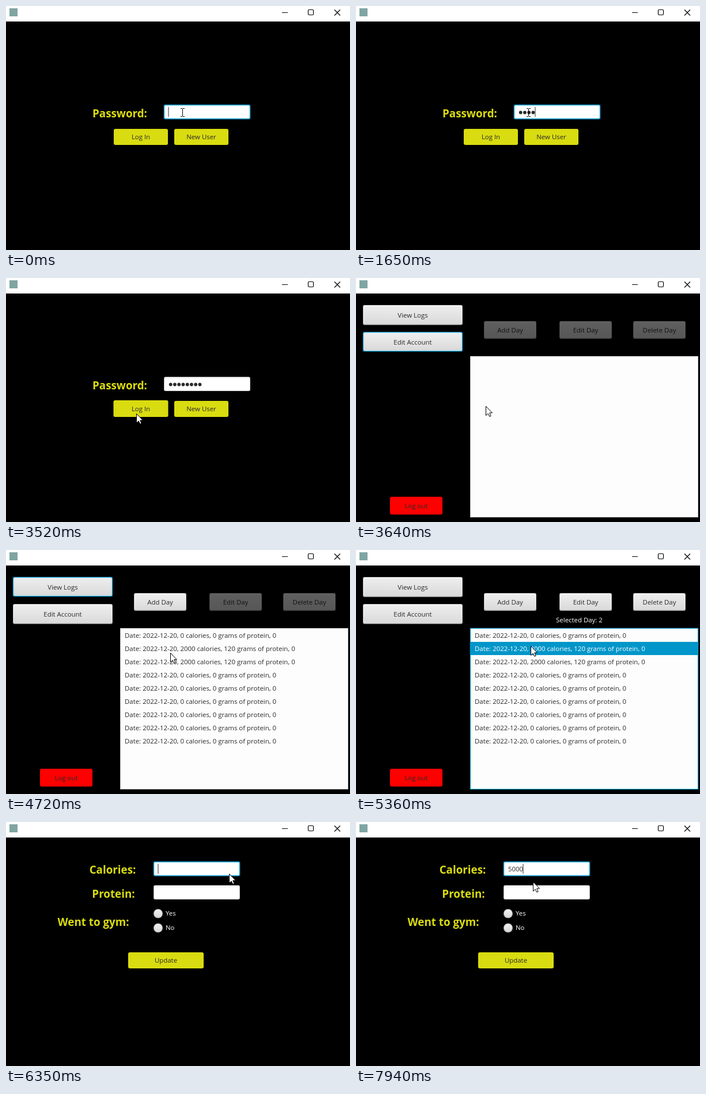
Animation, 597 px wide and 425 px high, one loop 8000 ms. Source, as an HTML page with a canvas:

```html
<!DOCTYPE html>
<html lang="en">
<head>
<meta charset="utf-8">
<title>Calorie log</title>
<style>
  html, body { margin: 0; width: 100%; height: 100%; overflow: hidden; background: #000; }
  canvas { display: block; }
</style>
</head>
<body>
<canvas id="stage" width="597" height="425"></canvas>
<script>
const g = document.getElementById('stage').getContext('2d');
const LOOP = 8000, TICK = 130;
const YELLOW = '#d9dc10', INK = '#2a2a2a', FOCUS = '#039ed3', FAINT = 'rgba(3,158,211,.14)';

// Where the pointer turns or rests: time, x, y.
const path = [
  [0, 306, 185], [480, 306, 185], [610, 299, 185], [2460, 299, 185], [3090, 198, 231],
  [3520, 226, 236], [3640, 225, 223], [4150, 128, 70], [4300, 128, 70], [4720, 285, 179],
  [5120, 285, 179], [6050, 414, 93], [6200, 414, 93], [6740, 303, 82], [7290, 303, 82],
  [7420, 307, 104]
];

const within = (t, from, to) => t >= from && t < to;
const keys = (t, first, count, gap) =>
  Math.max(0, Math.min(count, Math.floor((t - first) / gap) + 1));

function rect(x, y, w, h, inset, radius, fill) {
  g.fillStyle = fill;
  g.beginPath();
  g.roundRect(x + inset, y + inset, w - 2 * inset, h - 2 * inset, radius);
  g.fill();
}

function shade(y, h, top, bottom) {
  const s = g.createLinearGradient(0, y, 0, y + h);
  s.addColorStop(0, top);
  s.addColorStop(1, bottom);
  return s;
}

function text(str, x, y, color = INK, align = 'left', font = '11.43px') {
  g.font = font + ' "Open Sans", "Noto Sans", sans-serif';
  g.textAlign = align;
  g.fillStyle = color;
  g.fillText(str, x, Math.round(y));
}

const label = (str, x, y) => text(str, x, y, YELLOW, 'center', 'bold 18.8px');

function flatButton(str, x, y, w, h, color, focused) {
  if (focused) rect(x, y - .5, w, h, -.5, 3, color);
  else rect(x, y, w, h, 0, 3, color);
  text(str, x + w / 2, y + h / 2 + 4, INK, 'center');
}

function button(str, x, y, w, h, { focused, disabled, pressed } = {}) {
  const body = pressed ? shade(y, h, '#e0e0e0', '#cbcbcb') : shade(y, h, '#efefef', '#d9d9d9');
  const edge = shade(y, h, '#fff', '#e4e4e4');
  if (!focused) rect(x, y + 1, w, h, 0, 3, '#a0a0a0');
  rect(x, y, w, h, 0, 3, focused ? FOCUS : '#b5b5b5');
  rect(x, y, w, h, 1, 2, edge);
  rect(x, y, w, h, 2, 1, body);
  if (focused) {
    rect(x, y, w, h, -1.4, 4, FAINT);
    rect(x, y, w, h, 2.6, 1, body);
  }
  text(str, x + w / 2, y + h / 2 + 4.5, INK, 'center');
  if (disabled) rect(x, y, w, h + 1, 0, 0, 'rgba(0,0,0,.6)');
}

function field(x, y, focused) {
  const w = 150, h = 25;
  if (focused) {
    rect(x, y, w, h, -.2, 3, FOCUS);
    rect(x, y, w, h, 1, 2, '#fff');
    rect(x, y, w, h, -1.4, 4, FAINT);
    rect(x, y, w, h, 3, 0, '#fff');
  } else {
    rect(x, y, w, h, 0, 3, shade(y, h, '#b0b0b0', '#c4c4c4'));
    rect(x, y, w, h, 1, 2, shade(y, 5, '#f0f0f0', '#fff'));
  }
}

function caret(x, y) {
  g.fillStyle = INK;
  g.fillRect(x - .5, y, 1, 17);
}

function titleBar() {
  g.fillStyle = '#fff';
  g.fillRect(0, 0, 597, 27);
  rect(6, 4, 14, 14, 0, 0, '#7fa5a3');
  g.strokeStyle = '#000';
  g.lineWidth = 1.2;
  g.beginPath();
  g.moveTo(479, 11.5);
  g.lineTo(489, 11.5);
  g.roundRect(524.5, 6.5, 9, 9, 1.5);
  g.moveTo(570, 6.5);
  g.lineTo(580, 16.5);
  g.moveTo(580, 6.5);
  g.lineTo(570, 16.5);
  g.stroke();
}

function login(t) {
  const pressed = t >= 3520;
  const dots = keys(t, 1270, 4, 126) + keys(t, 1950, 3, 120) + keys(t, 2460, 1, 1);
  const blink = within(t, 310, 610) || within(t, 1140, 1270) || within(t, 2960, 3460);
  label('Password:', 197.5, 194);
  field(274, 172, !pressed);
  g.fillStyle = INK;
  for (let i = 0; i < dots; i++) {
    g.beginPath();
    g.arc(285.7 + 7.25 * i, 185.5, 2.9, 0, 7);
    g.fill();
  }
  if (!pressed && !blink) caret(282 + 7.25 * dots, 176);
  flatButton('Log In', 187, 214, 94, 28, YELLOW, pressed);
  flatButton('New User', 292, 214, 94, 28, YELLOW);
}

function dayList(loaded, selected, focused) {
  if (focused) rect(198, 136, 396, 281, -1.4, 3, FAINT);
  rect(198, 136, 396, 281, 0, 0, focused ? FOCUS : '#c0c0c0');
  rect(198, 136, 396, 281, 1, 0, '#fdfdfd');
  if (!loaded) return;
  for (let i = 0; i < 9; i++) {
    const chosen = selected && i === 1;
    if (chosen) rect(199, 160, 394, 23, 0, 0, focused ? '#0096c9' : '#d0d0d0');
    const food = i === 1 || i === 2
      ? '2000 calories, 120 grams of protein' : '0 calories, 0 grams of protein';
    text(`Date: 2022-12-20, ${food}, 0`, 206, 153 + 23 * i, chosen && focused ? '#fff' : INK);
  }
}

function dashboard(t) {
  const viewed = t >= 4150, loaded = t >= 4300, selected = t >= 5120, editing = t >= 6050;
  button('View Logs', 12, 47, 173, 34, { focused: viewed && !selected });
  button('Edit Account', 12, 94, 173, 34, { focused: !viewed });
  button('Add Day', 222, 75, 91, 30, { disabled: !loaded });
  button('Edit Day', 353, 75, 91, 30, { disabled: !selected, focused: editing, pressed: editing });
  button('Delete Day', 481, 75, 91, 30, { disabled: !selected });
  if (selected) text('Selected Day: 2', 387.5, 126, '#fff', 'center');
  dayList(loaded, selected, selected && !editing);
  flatButton('Log out', 59, 381, 91, 31, '#f00');
}

function radio(str, y) {
  rect(256, y - 8, 16, 16, 0, 8, '#b5b5b5');
  rect(256, y - 8, 16, 16, 1, 7, shade(y - 8, 16, '#f4f4f4', '#d6d6d6'));
  text(str, 277, y + 3.5, '#fff');
}

function form(t) {
  const typed = keys(t, 7420, 4, 173);
  label('Calories:', 185, 90);
  label('Protein:', 186.5, 132);
  label('Went to gym:', 151.5, 181);
  field(256, 69, true);
  field(256, 110, false);
  text('5000'.slice(0, typed), 264, 86);
  if (t < 7140 || typed) caret(264 + 6.5 * typed, 73);
  radio('Yes', 159.5);
  radio('No', 184.5);
  flatButton('Update', 212, 227, 131, 28, YELLOW);
}

function beam(x, y) {
  g.fillStyle = '#000';
  g.fillRect(x, y - 6, 1, 13);
  for (const end of [y - 7, y + 7]) {
    g.fillRect(x - 3, end, 3, 1);
    g.fillRect(x + 1, end, 3, 1);
  }
}

function arrow(x, y) {
  const shape = [[0, 0], [0, 16], [3.7, 12.6], [6.2, 17.8], [8.6, 16.8], [6.3, 11.4], [11, 11.4]];
  g.beginPath();
  for (const [dx, dy] of shape) g.lineTo(x + .5 + dx, y + .5 + dy);
  g.closePath();
  g.fillStyle = '#fff';
  g.fill();
  g.strokeStyle = '#000';
  g.lineWidth = 1;
  g.stroke();
}

// The pointer is redrawn once per tick, counted from its last turn.
function pointer(t) {
  const i = path.findLastIndex(p => t >= p[0]);
  const [t0, x0, y0] = path[i], [t1, x1, y1] = path[i + 1] || [LOOP, x0, y0];
  const k = Math.floor((t - t0) / TICK) * TICK / (t1 - t0);
  const overText = t < 2720 || within(t, 6460, 7420);
  (overText ? beam : arrow)(Math.round(x0 + (x1 - x0) * k), Math.round(y0 + (y1 - y0) * k));
}

function draw(now) {
  const t = now % LOOP;
  g.fillStyle = '#000';
  g.fillRect(0, 0, 597, 425);
  titleBar();
  (t < 3640 ? login : t < 6200 ? dashboard : form)(t);
  pointer(t);
}

const start = performance.now();
function tick() {
  draw(performance.now() - start);
  requestAnimationFrame(tick);
}
tick();
</script>
</body>
</html>
```
